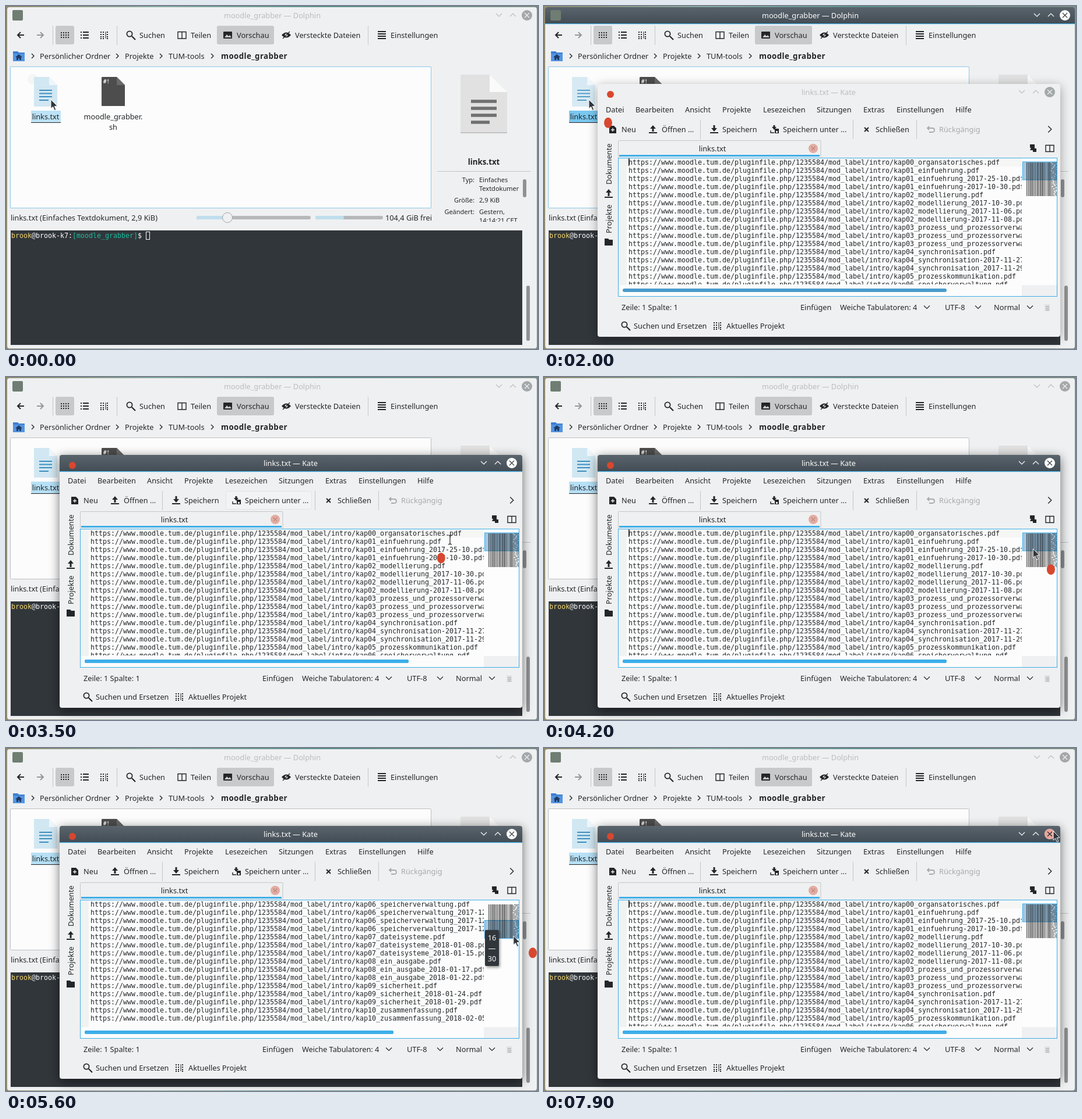
An HTML page for the animation above (8000 ms loop, 913 by 590 pixels).

```html
<!DOCTYPE html>
<html lang="de">
<head>
<meta charset="utf-8">
<title>moodle_grabber</title>
<style>
html, body { margin: 0; width: 100%; height: 100%; overflow: hidden; background: #eff0f1; }
svg { display: block; width: 913px; height: 590px; }
text { font: 12.75px 'Noto Sans', sans-serif; fill: #232629; white-space: pre; }
.b { font-size: 13.3px; font-weight: 700; }
.s { font-size: 11px; }
.m { font: 11.63px 'DejaVu Sans Mono', monospace; }
.mid { text-anchor: middle; }
.end { text-anchor: end; }
.ln { fill: none; stroke: #232629; stroke-width: 1.4; }
</style>
</head>
<body>
<svg id="stage" viewBox="0 0 913 590"></svg>
<script>
const INK = '#232629', BLUE = '#3daee9', RED = '#d8472f', BG = '#eff0f1';

const text = (x, y, s, cls = '', more = '') => `<text x="${x}" y="${y}" class="${cls}" ${more}>${s}</text>`;
const rect = (x, y, w, h, fill, more = '') => `<rect x="${x}" y="${y}" width="${w}" height="${h}" fill="${fill}" ${more}/>`;
const line = (d, more = '') => `<path class="ln" d="${d}" ${more}/>`;
const shape = (d, fill = INK, more = '') => `<path d="${d}" fill="${fill}" ${more}/>`;
const disc = (x, y, r, fill, more = '') => `<circle cx="${x}" cy="${y}" r="${r}" fill="${fill}" ${more}/>`;
const group = (id, body, more = '') => `<g id="${id}" ${more}>${body}</g>`;
const clip = (id, x, y, w, h) => `<clipPath id="${id}">${rect(x, y, w, h, '#000')}</clipPath>`;
const row = (y, items) => items.map(([x, s]) => text(x, y, s)).join('');
const dots = (xs, ys) => xs.map(x => ys.map(y => rect(x, y, 2, 2, INK)).join('')).join('');
const sep = (x, y) => line(`M${x} ${y}v33`, 'style="stroke:#c3c6c8;stroke-width:1"');
const down = (x, y) => line(`M${x - 5} ${y - 2.5}l5 5 5-5`, 'style="stroke-width:1.2"');
const right = (x, y, k = 1) => line(`M${x - 2 * k} ${y - 4 * k}l${4 * k} ${4 * k} ${-4 * k} ${4 * k}`);
const lens = (x, y) => line(`M${x + 4} ${y + 4}l6 6`, 'style="stroke-width:2.2"') +
  disc(x, y, 4.6, 'none', `stroke="${INK}" stroke-width="1.8"`);

// Inactive caption with the active one on top, which is faded in
function caption(id, x, y, w, h, title, mid, close) {
  const cy = y + 14;
  const parts = (ink, knob, cross) => text(mid, cy + 5, title, 'mid', `style="fill:${ink}"`) +
    line(`M${close - 53} ${cy - 3}l5 5 5-5M${close - 29} ${cy + 2}l5-5 5 5`, `style="stroke:${ink};stroke-width:1.2"`) +
    disc(close, cy, 9, knob) +
    line(`M${close - 4} ${cy - 4}l8 8m0-8l-8 8`, `style="stroke:${cross};stroke-width:1.2"`);
  const top = `M${x} ${y + h}V${y + 4}q0-4 4-4H${x + w - 4}q4 0 4 4V${y + h}Z`;
  return parts('#babdbf', '#a4a8ab', BG) +
    group(id, shape(top, 'url(#cap)') + rect(x, y + h - 1, w, 1.2, BLUE) + parts('#fcfcfc', '#fcfcfc', '#3a4248'));
}

const page = (x, y, w, h, fold, fill, corner) =>
  shape(`M${x + 1} ${y}H${x + w - fold}l${fold} ${fold}V${y + h}H${x}V${y + 1}Z`, fill) +
  shape(`M${x + w - fold} ${y}v${fold}h${fold}Z`, corner);
const slider = (x, w, fill) => rect(x, 361, w, 6, '#b6b8ba', 'rx="3"') +
  rect(x, 361, fill, 6, '#c0deed', 'rx="3"') + rect(x, 361, fill, 6, BLUE, 'rx="3" class="act"');

const fileManager = () =>
  rect(2, 2, 909, 587, BG, 'rx="4"') +
  caption('capA', 2, 2, 909, 29, 'moodle_grabber — Dolphin', 457, 894) +
  rect(11, 7, 18, 18, '#6f7d72', 'rx="2"') +
  line('M31 50H20m5-5l-5 5 5 5', 'style="stroke-width:2"') +
  line('M53 50h11m-5-5l5 5-5 5', 'style="stroke:#95989a;stroke-width:2"') +
  sep(80.5, 34) + sep(190.5, 34) + sep(621.5, 34) +
  rect(85, 34, 32, 32, '#c7c9cb', 'rx="3"') + rect(362, 34, 98, 32, '#c7c9cb', 'rx="3"') +
  dots([94, 98, 102, 106], [45, 49, 53]) +
  dots([128], [44, 49, 54]) + line('M132 45h10m-10 5h10m-10 5h10', 'style="stroke-width:2"') +
  dots([162, 166, 173], [44, 48, 52, 55]) + line('M171 44v12', 'style="stroke-width:1"') +
  lens(212, 48) + line('M295 44.5h14v11.5h-14zm7 0v12') +
  rect(373, 44, 15, 12, INK, 'rx="1"') + shape('M375 54l4-5 3 3 2-2 3 4z', '#c7c9cb') +
  shape('M473 50q8-9 16 0q-8 9-16 0z') + disc(481, 50, 2.4, BG) + line('M475 56l12-12') +
  line('M638 44h14m-14 4h14m-14 4h14m-14 4h14', 'style="stroke-width:1.8"') +
  row(55, [[229, 'Suchen'], [317, 'Teilen'], [396, 'Vorschau'], [496, 'Versteckte Dateien'], [660, 'Einstellungen']]) +
  shape('M12 78h8l2 2h10v15H12z', '#3d7fd3') + rect(12, 82, 20, 13, '#5294e2', 'rx="1"') +
  shape('M22 83l6 5h-2v5h-3v-3h-2v3h-3v-5h-2z', '#1f3b66') +
  [46, 191, 266, 354].map(x => right(x, 86)).join('') +
  row(91, [[58, 'Persönlicher Ordner'], [204, 'Projekte'], [279, 'TUM-tools']]) +
  text(369, 91, 'moodle_grabber', 'b', 'letter-spacing=".4"') +
  rect(7.5, 104.5, 722, 243, '#fcfcfc', 'stroke="#bcc0c2" rx="1"') +
  rect(7.5, 104.5, 722, 243, 'none', 'stroke="#8cc8e8" rx="1" id="focus"') +
  disc(46, 126, 9, '#f4f5f5', 'id="mark"') +
  group('doc', page(48, 122, 40, 51, 14, '#d1e7f2', '#eef6fa') +
    line('M57 145h22m-22 5.5h22m-22 5.5h22m-22 6h16', 'style="stroke:#3d8fc0;stroke-width:2.2"')) +
  rect(43, 180, 51, 20, BLUE, 'id="sel"') + rect(43, 200, 51, 1, INK, 'id="under"') +
  text(68, 195, 'links.txt', 'mid', 'id="name"') +
  page(164, 122, 40, 50, 14, '#4d4d4d', '#6a6a6a') +
  text(167, 133, '#!', 'm', 'style="fill:#fff;font-size:9px;font-weight:700"') +
  text(184, 195, 'moodle_grabber.', 'mid') + text(184, 213, 'sh', 'mid') +
  text(8, 369, 'links.txt (Einfaches Textdokument, 2,9 KiB)') +
  slider(327, 196, 50) + slider(531, 116, 49) +
  disc(380, 364, 8.5, BG, 'stroke="#a3a6a8"') + text(651, 369, '104,4 GiB frei') +
  page(780, 118, 80, 100, 30, '#e1e1e1', '#fafafa') + rect(780, 217, 80, 2, '#c2c2c2') +
  line('M798 164h44m-44 12h44m-44 12h44m-44 12h32', 'style="stroke:#707070;stroke-width:5.5"') +
  text(820, 273, 'links.txt', 'b mid') + rect(740, 284, 160, 1, '#c0c3c5') +
  `<g clip-path="url(#info)">${text(804, 303, 'Typ:', 's end')}${text(812, 303, 'Einfaches', 's')}
  ${text(812, 318, 'Textdokument', 's')}${text(804, 338, 'Größe:', 's end')}${text(812, 338, '2,9 KiB', 's')}
  ${text(804, 358, 'Geändert:', 's end')}${text(812, 358, 'Gestern,', 's')}${text(812, 373, '14:14:21 CET', 's')}</g>` +
  rect(887, 298, 6, 31, '#8f9193', 'rx="3"') + rect(893, 481, 6, 95, '#8f9193', 'rx="3"') +
  rect(8, 386, 878, 197, '#31363b') +
  `<text x="9" y="399" class="m" style="fill:#fcfcfc"><tspan fill="#f5d76e">brook</tspan>@brook-k7:<tspan fill="#1abc9c">[moodle_grabber]</tspan>$</text>` +
  rect(240.5, 388.5, 6, 13, 'none', 'stroke="#fcfcfc"');

// Contents of the text file, grouped by chapter
const chapters = {
  kap00_organsatorisches: [''],
  kap01_einfuehrung: ['', '_2017-25-10', '-2017-10-30'],
  kap02_modellierung: ['', '_2017-10-30', '_2017-11-06', '-2017-11-08'],
  kap03_prozess_und_prozessorverwaltung: ['', '_2017-11-13', '_2017-11-20'],
  kap04_synchronisation: ['', '-2017-11-27', '_2017-11-29'],
  kap05_prozesskommunikation: [''],
  kap06_speicherverwaltung: ['', '_2017-12-06', '_2017-12-11', '_2017-12-18'],
  kap07_dateisysteme: ['', '_2018-01-08', '_2018-01-15'],
  kap08_ein_ausgabe: ['', '_2018-01-17', '_2018-01-22'],
  kap09_sicherheit: ['', '_2018-01-24', '_2018-01-29'],
  kap10_zusammenfassung: ['', '_2018-02-05']
};
const links = Object.entries(chapters).flatMap(([name, ends]) => ends.map(end =>
  `https://www.moodle.tum.de/pluginfile.php/1235584/mod_label/intro/${name}${end}.pdf`));

function miniMap() {
  let seed = 7, out = '';
  const rnd = () => (seed = seed * 16807 % 2147483647) / 2147483647;
  for (let x = 827; x < 869; x++) out += rect(x, 269, 1, 58, '#4c4c4c', `opacity="${(.15 + .7 * rnd()).toFixed(2)}"`);
  links.forEach((s, i) => {
    const w = Math.min(11, (s.length - 64) * .45);
    out += rect(869, 269 + i * 1.95, w, 1.2, '#777') + rect(869 + w * rnd(), 269 + i * 1.95, 2, 1.2, '#fff');
  });
  return out;
}

const editor = () =>
  rect(92, 134, 794, 435, '#000', 'rx="4" id="shade" filter="url(#blur)"') +
  rect(92, 134, 794, 435, BG, 'rx="4"') +
  caption('capB', 92, 134, 794, 29, 'links.txt — Kate', 488.5, 868) +
  disc(868, 148, 9, '#e9a59c', 'id="hot"') + line('M864 144l8 8m0-8l-8 8', 'id="hotX" style="stroke-width:1.2"') +
  disc(114, 152, 6, RED) +
  row(183, [[106, 'Datei'], [157, 'Bearbeiten'], [242, 'Ansicht'], [306, 'Projekte'], [376, 'Lesezeichen'],
    [468, 'Sitzungen'], [548, 'Extras'], [605, 'Einstellungen'], [706, 'Hilfe']]) +
  rect(377.5, 196.5, 147, 31, '#f2f3f4', 'stroke="#e1e4e6" rx="3" id="hover"') +
  row(217, [[133, 'Neu'], [202, 'Öffnen ...'], [306, 'Speichern'], [410, 'Speichern unter ...'], [569, 'Schließen']]) +
  text(678, 217, 'Rückgängig', '', 'style="fill:#a7aaac"') +
  shape('M112 206h8l4 4v9h-12z') + line('M118 210v6m-3-3h6', `style="stroke:${BG}"`) +
  shape('M187 205l5 6h-3.500v5h-3v-5H182z') + rect(180, 217, 14, 2, INK) +
  shape('M292 216l-5-6h3.500v-5h3v5H297z') + rect(285, 217, 14, 2, INK) +
  shape('M395 213l-4-5h2.500v-3h3v3H399z') + line('M389 214v4h6') + rect(396, 211, 7, 8, INK) + rect(398, 215, 3, 3, BG) +
  line('M550 209l7 7m0-7l-7 7', 'style="stroke-width:2"') +
  line('M661 207l-3 3 3 3m-3-3h8q4 0 4 3.500t-4 3.500h-5', 'style="stroke:#a7aaac;stroke-width:1.8"') +
  sep(268.5, 196) + sep(530.5, 196) + sep(639.5, 196) + right(868, 212, 1.4) +
  line('M127.500 260V232.500q0-1 1-1H474q1 0 1 1V260', 'style="stroke:#c3c6c8;stroke-width:1"') +
  rect(129, 256, 344, 3, BLUE) + text(289, 250, 'links.txt', 'mid') +
  disc(462, 245, 8, '#e2aca2') + line('M459 242l6 6m0-6l-6 6', 'style="stroke:#9c6259;stroke-width:1.2;stroke-dasharray:1.500"') +
  shape('M834 238h8v7h3v6h-6v-3h-5l2-4h-2z') + line('M861 239.500h14v11h-14zm7 0v11') +
  text(0, 0, 'Dokumente', '', 'transform="translate(116 307)rotate(-90)"') +
  text(0, 0, 'Projekte', '', 'transform="translate(116 391)rotate(-90)"') +
  shape('M111 315l5 6h-3.500v6h-3v-6H106z') + rect(104, 328, 14, 2, INK) + shape('M104 400h6l2 2h6v10h-14z') +
  rect(127.5, 261.5, 753, 238, '#fcfcfc') + rect(128, 262, 14, 218, '#f1f2f2') +
  `<g clip-path="url(#page)"><g id="lines">${rect(142, 262, 680, 14, '#f6f6f5')}${
    links.map((s, i) => text(145, 272.5 + 14 * i, s, 'm')).join('')}${rect(145, 262, 1.5, 13, INK, 'id="caret"')}</g></g>` +
  rect(820, 262, 61, 218, '#fdfdfd') + rect(820, 480, 61, 19, BG) + miniMap() +
  rect(821.5, 268, 58.5, 31, '#a4c9e4', `stroke="${BLUE}" id="view" style="mix-blend-mode:multiply"`) +
  rect(135, 486, 556, 6, '#4a9bcc', 'rx="3" class="bar"') + rect(135, 486, 556, 6, BLUE, 'rx="3" class="bar" id="barOn"') +
  rect(127.5, 261.5, 753, 238, 'none', `stroke="${BLUE}"`) +
  row(523, [[133, 'Zeile: 1 Spalte: 1'], [440, 'Einfügen'], [508, 'Weiche Tabulatoren: 4'], [688, 'UTF-8'], [772, 'Normal']]) +
  [657, 745, 834].map(x => down(x, 518)).join('') +
  rect(859, 513, 9, 12, '#e0e2e3') + line('M861 517h6m-6 3h6m-6 3h6', 'style="stroke:#9a9da0;stroke-width:1"') +
  lens(138, 548) + dots([291, 295, 302], [544, 548, 552, 555]) + line('M300 544v12', 'style="stroke-width:1"') +
  row(555, [[154, 'Suchen und Ersetzen'], [313, 'Aktuelles Projekt']]) +
  group('tip', rect(822, 0, 24, 63, '#000', 'rx="3" opacity=".35" filter="url(#soft)"') +
    rect(822, 0, 24, 62, '#31363b', 'rx="2"') +
    ['from', 'dash', 'to'].map((id, i) => text(834, 18 + 18 * i, '—', 'mid', `id="${id}" style="fill:#fcfcfc"`)).join(''));

document.getElementById('stage').innerHTML = `<defs>
<linearGradient id="cap" x2="0" y2="1"><stop stop-color="#5a646c"/><stop offset="1" stop-color="#434c54"/></linearGradient>
<linearGradient id="wall"><stop stop-color="#8f8a70"/><stop offset=".3" stop-color="#86aaa2"/><stop offset=".6" stop-color="#5d8f8c"/><stop offset="1" stop-color="#7c8d88"/></linearGradient>
<filter id="blur" x="-10%" y="-10%" width="120%" height="120%"><feOffset dy="4"/><feGaussianBlur stdDeviation="9"/></filter>
<filter id="soft" x="-50%" width="200%"><feOffset dx="2" dy="2"/><feGaussianBlur stdDeviation="2"/></filter>
${clip('info', 740, 286, 140, 85)}${clip('page', 129, 262, 691, 217)}</defs>` +
  rect(0, 0, 913, 590, 'url(#wall)') + fileManager() + group('kate', editor()) +
  `<ellipse id="launch" rx="7" ry="9" fill="${RED}"/>` +
  shape('M0 0V15.500L3.600 12.300 6.300 18.500 8.800 17.400 6.200 11.500 11 11Z', '#31363b', 'id="arrow" stroke="#fcfcfc"') +
  line('M-3-8q3 0 3 2V6q0 2-3 2M3-8q-3 0-3 2V6q0 2 3 2', 'id="beam" style="stroke-width:1.2"');

const el = {};
document.querySelectorAll('[id]').forEach(e => el[e.id] = e);
const set = (id, name, value) => el[id].setAttribute(name, value);
const fade = (id, v) => set(id, 'opacity', +v);
const place = (id, x, y) => set(id, 'transform', `translate(${x} ${y})`);
const ramp = (t, a, b) => Math.min(1, Math.max(0, (t - a) / (b - a)));

// Linear interpolation through [time, value...] stops
function along(t, stops) {
  const i = stops.findIndex(s => s[0] > t);
  if (i < 0) return stops[stops.length - 1].slice(1);
  if (!i) return stops[0].slice(1);
  const a = stops[i - 1], b = stops[i], k = ramp(t, a[0], b[0]);
  return a.slice(1).map((v, j) => v + (b[j + 1] - v) * k);
}
const route = [[2700, 77, 161], [3000, 160, 176], [3300, 440, 212], [3500, 762, 280], [3700, 800, 292], [4400, 855, 297],
  [4700, 855, 295], [5200, 872, 322], [5900, 870, 324], [6500, 853, 280], [7000, 852, 268], [7200, 852, 268], [7900, 874, 143]];
const scrolling = [[4500, 0], [4700, 5], [5100, 13], [5500, 15], [6000, 15], [6500, 6], [6900, 0]];

function draw(now) {
  const t = Math.floor(now % 8000 / 100) * 100;
  const woken = ramp(t, 700, 1000), swap = ramp(t, 2000, 2300), active = woken - swap;
  const picked = woken - ramp(t, 1800, 2000) / 2 - swap / 2;
  fade('capA', active);
  document.querySelectorAll('.act').forEach(e => e.setAttribute('opacity', active));
  fade('focus', 1 - ramp(t, 2700, 3000));
  fade('mark', t < 800);
  fade('doc', 1 - .15 * woken + .15 * ramp(t, 2700, 3000));
  fade('sel', (t < 100 ? .33 : .36) + .64 * picked);
  fade('under', picked < .6);
  el.name.style.fill = picked > .6 ? '#fcfcfc' : INK;

  fade('kate', ramp(t, 1800, 2000));
  fade('capB', swap);
  fade('barOn', swap);
  fade('shade', .35 + .2 * swap);
  fade('hover', t >= 3200 && t < 3600);
  fade('hot', t >= 7900);
  fade('hotX', t >= 7900);

  const top = Math.round(along(t, scrolling)[0]);
  place('lines', 0, -14 * top);
  fade('caret', (t + 100) % 1000 < 500);
  set('view', 'y', 268 + 1.9 * top);
  document.querySelectorAll('.bar').forEach(e => e.setAttribute('width', top > 8 ? 530 : 556));
  const shown = ramp(t, 4400, 4900) - ramp(t, 7100, 7300);
  fade('tip', t < 4600 ? 0 : shown);
  place('tip', 0, 298 + top - 15 * (1 - ramp(t, 4400, 4900)));
  el.from.textContent = top + 1;
  el.to.textContent = top + 15;

  const [x, y] = along(t, route), [lx, ly] = along(t - 30, route);
  const overText = x > 142 && x < 820 && y > 262;
  fade('arrow', !overText);
  fade('beam', overText);
  place('arrow', x, y);
  place('beam', x, y);
  fade('launch', t >= 1300 && t < 6300);
  place('launch', lx + 33, ly + 46 - 17 * Math.abs(Math.sin(Math.PI * (t - 1300) / 372)));
}

const start = performance.now();
(function loop() {
  draw(performance.now() - start);
  requestAnimationFrame(loop);
})();
</script>
</body>
</html>
```
